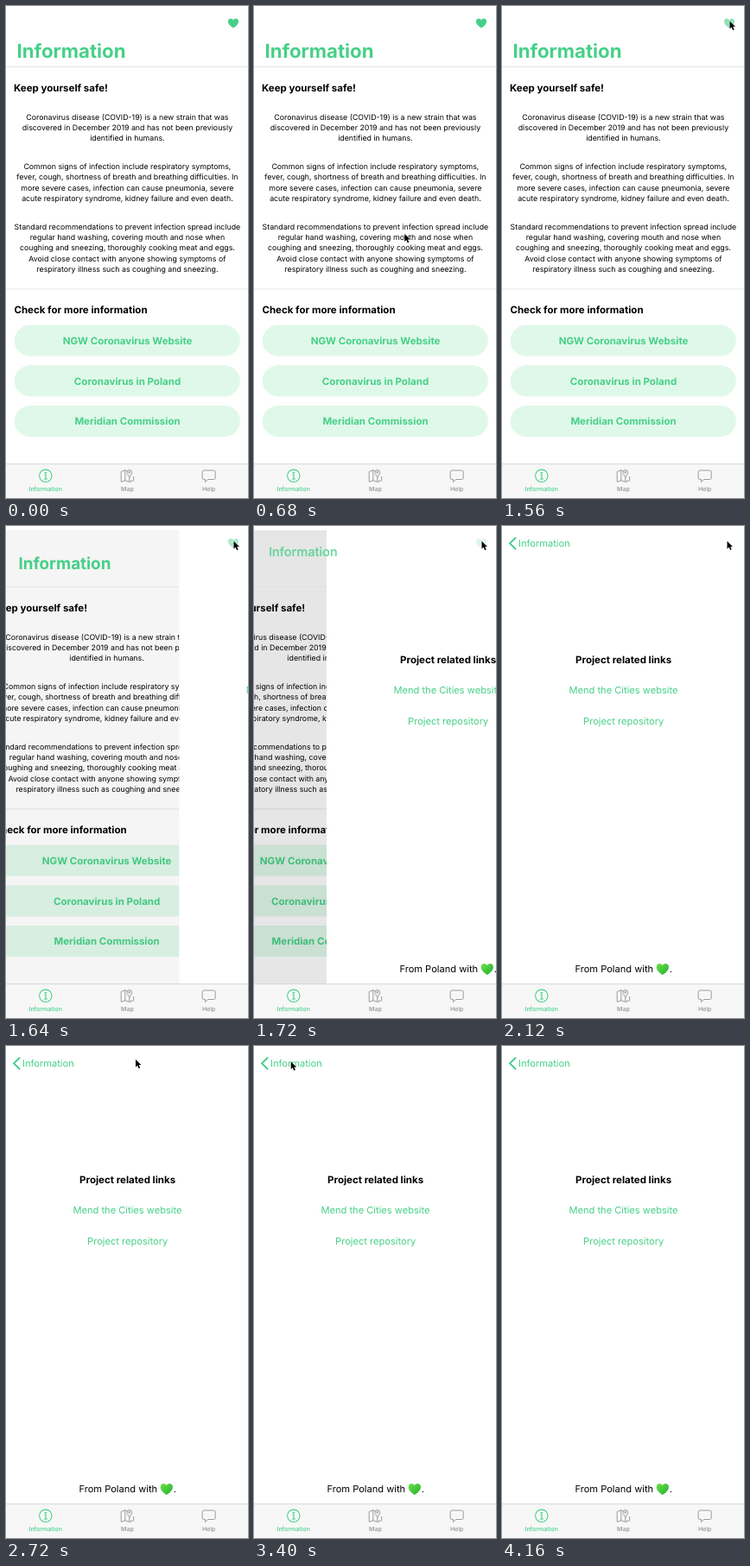
An HTML page for the animation above (4.52 s loop, 280 px wide and 570 px high).

```html
<!DOCTYPE html>
<html lang="en">
<head>
<meta charset="utf-8">
<title>Information app</title>
<style>
  html, body { margin: 0; width: 100%; height: 100%; overflow: hidden; background: #fff; }
  svg { display: block; width: 100vw; height: 100vh; }
  text { font-family: Inter, "Liberation Sans", sans-serif; text-anchor: middle; text-rendering: geometricPrecision; fill: #000; }
  .body { font-size: 8.8px; }
  .head { font-size: 11.5px; font-weight: 700; }
  .button { font-size: 11.5px; font-weight: 700; fill: #46d087; }
  .link { font-size: 11.1px; fill: #46d087; }
  .plain { font-size: 11.1px; }
  .title { font-size: 22.2px; font-weight: 700; fill: #46d087; }
  .tab { font-size: 7px; font-weight: 500; fill: #929292; }
  .active { fill: #46d087; }
  .icon { fill: none; stroke: #929292; stroke-width: .9; stroke-linejoin: round; }
  .rule { stroke: #dcdcdc; stroke-width: .7; }
</style>
</head>
<body>
<svg viewBox="0 0 280 570" preserveAspectRatio="none">
  <defs>
    <path id="heartShape" d="M0 5.6C-3.6 3-6.1.7-6.1-2.1C-6.1-4.1-4.7-5.4-3-5.4C-1.7-5.4-.6-4.7 0-3.6C.6-4.7 1.7-5.4 3-5.4C4.7-5.4 6.1-4.1 6.1-2.1C6.1.7 3.6 3 0 5.6Z"/>
    <linearGradient id="emoji" x1="0" y1="0" x2="1" y2="1">
      <stop offset="0" stop-color="#6fe04a"/><stop offset="1" stop-color="#1fae2c"/>
    </linearGradient>
  </defs>
  <g id="home">
    <line class="rule" x1="0" x2="280" y1="328" y2="328"/>
  </g>
  <line id="navRule" class="rule" x1="0" x2="280" y1="70.5" y2="70.5"/>
  <rect id="dim" y="5" width="280" height="526"/>
  <g id="about">
    <rect width="280" height="531" fill="#fff"/>
    <use href="#heartShape" transform="translate(185.8 513.4) scale(1.17 1.2)" fill="url(#emoji)"/>
  </g>
  <g id="big"></g>
  <g id="small"></g>
  <path id="chevron" d="M15.6 13.7L9 20.1L15.6 26.5" fill="none" stroke="#46d087" stroke-width="2" stroke-linecap="round" stroke-linejoin="round"/>
  <use id="heart" href="#heartShape" x="263" y="20" fill="#46d087"/>
  <g id="tabs">
    <rect y="530.5" width="280" height="39.5" fill="#f7f7f7"/>
    <line x1="0" x2="280" y1="530.6" y2="530.6" stroke="#c9c9c9" stroke-width=".7"/>
    <g transform="translate(45.8 544.3)" fill="none" stroke="#46d087" stroke-width="1.1">
      <circle r="7.2"/>
      <path d="M-1.6-1H.2V3.6M-1.9 3.7H2.1"/>
      <circle cy="-3.4" r=".5" fill="#46d087"/>
    </g>
    <g class="icon">
      <path d="M140 538.6L137.8 537.8L133.2 539.4V551.3L137.8 549.7L142.8 551.3L147.7 549.7V545M137.8 537.8V549.7M142.8 545.4V551.3"/>
      <path d="M142.8 545.6C140.9 543.3 139.9 541.8 139.9 540.4A2.9 2.9 0 0 1 145.7 540.4C145.7 541.8 144.7 543.3 142.8 545.6Z"/>
      <circle cx="142.8" cy="540.3" r="1"/>
      <path d="M229 538H240.3Q242.2 538 242.2 539.9V546.6Q242.2 548.5 240.3 548.5H233.6L230.6 551.6V548.5H229Q227.1 548.5 227.1 546.6V539.9Q227.1 538 229 538Z"/>
    </g>
  </g>
  <path id="cursor" d="M0 0V9.6L2.2 7.5L3.8 11.1L5.5 10.4L3.9 6.9H6.8Z" stroke="#fff" stroke-width=".8" paint-order="stroke"/>
</svg>
<script>
const NS = 'http://www.w3.org/2000/svg';
const $ = id => document.getElementById(id);

function add(parent, tag, attrs, text) {
  const el = document.createElementNS(NS, tag);
  for (const k in attrs) el.setAttribute(k, attrs[k]);
  if (text) el.textContent = text;
  $(parent).appendChild(el);
}
const label = (parent, cls, x, y, text) => add(parent, 'text', { class: cls, x, y }, text);

function paragraph(y, lines) {
  lines.forEach((line, i) => label('home', 'body', 140.4, y + i * 12.3, line));
}

label('home', 'head', 63.5, 98.6, 'Keep yourself safe!');
paragraph(131.7, [
  'Coronavirus disease (COVID-19) is a new strain that was',
  'discovered in December 2019 and has not been previously',
  'identified in humans.'
]);
paragraph(189.1, [
  'Common signs of infection include respiratory symptoms,',
  'fever, cough, shortness of breath and breathing difficulties. In',
  'more severe cases, infection can cause pneumonia, severe',
  'acute respiratory syndrome, kidney failure and even death.'
]);
paragraph(258.6, [
  'Standard recommendations to prevent infection spread include',
  'regular hand washing, covering mouth and nose when',
  'coughing and sneezing, thoroughly cooking meat and eggs.',
  'Avoid close contact with anyone showing symptoms of',
  'respiratory illness such as coughing and sneezing.'
]);
label('home', 'head', 86.5, 355.8, 'Check for more information');
['NGW Coronavirus Website', 'Coronavirus in Poland', 'Meridian Commission'].forEach((text, i) => {
  const y = 369.5 + i * 46.8;
  add('home', 'rect', { x: 9.8, y, width: 261, height: 36, rx: 18, fill: '#e0f8e9' });
  label('home', 'button', 140.5, y + 22.2, text);
});

label('about', 'head', 140.6, 158.6, 'Project related links');
label('about', 'link', 140.5, 194.2, 'Mend the Cities website');
label('about', 'link', 140.7, 230.2, 'Project repository');
label('about', 'plain', 129.8, 517.3, 'From Poland with');
label('about', 'plain', 195.4, 517.3, '.');

label('big', 'title', 0, 8, 'Information');
label('small', 'link', 0, 4.1, 'Information');

label('tabs', 'tab active', 45.7, 562, 'Information');
label('tabs', 'tab', 140.4, 562, 'Map');
label('tabs', 'tab', 234.6, 562, 'Help');

const LOOP = 4520, STEP = 40;
const PRESS = 1480, PUSH = 1579, SPRING = 0.0173;
const SHOW = 440, HIDE = 3720;

// time, x, y of the pointer tip
const path = [
  [440, 275, 362], [680, 174.5, 264], [960, 246, 52], [1160, 263.8, 17.5],
  [2040, 263.8, 17.5], [2560, 217, 16], [2720, 150.3, 15.5], [3120, 95, 17],
  [3400, 43, 18], [3680, 192.5, 20.5]
];

const clamp = v => Math.max(0, Math.min(1, v));
const mix = (a, b, k) => a + (b - a) * k;
const move = (id, x, y, s = 1) => $(id).setAttribute('transform', `translate(${x} ${y}) scale(${s})`);
const fade = (id, v) => $(id).setAttribute('opacity', clamp(v));

function pointer(t) {
  let i = 0;
  while (i < path.length - 2 && t >= path[i + 1][0]) i++;
  const [t0, x0, y0] = path[i], [t1, x1, y1] = path[i + 1];
  const k = clamp((t - t0) / (t1 - t0)), e = k * k * (3 - 2 * k);
  return [mix(x0, x1, e), mix(y0, y1, e)];
}

// 1 on the first screen, settling to 0 on the second
function remaining(t) {
  const s = Math.max(0, t - PUSH) * SPRING;
  const p = (1 + s) * Math.exp(-s);
  return p < 0.002 ? 0 : p;
}

function draw(t) {
  const p = remaining(t);
  move('home', -84 * (1 - p), 0);
  move('about', 280 * p, 0);
  fade('dim', 0.1 * Math.min(1, (1 - p) * 1.4));
  fade('navRule', p);

  const x = mix(48.8, 75.5, p), y = mix(20, 52, p), w = mix(59, 125, p);
  move('big', x, y, w / 125);
  move('small', x, y, w / 59);
  fade('big', p * 1.4);
  fade('small', 1 - p);
  fade('chevron', 1 - p * 3.5);
  fade('heart', t < PRESS ? 1 : 0.6 * p);

  const [cx, cy] = pointer(t);
  move('cursor', cx - 0.3, cy, 0.94);
  fade('cursor', t >= SHOW && t < HIDE ? 1 : 0);
}

const start = performance.now();
function frame() {
  const t = (performance.now() - start) % LOOP;
  draw(Math.floor(t / STEP) * STEP);
  requestAnimationFrame(frame);
}
draw(0);
requestAnimationFrame(frame);
</script>
</body>
</html>
```
